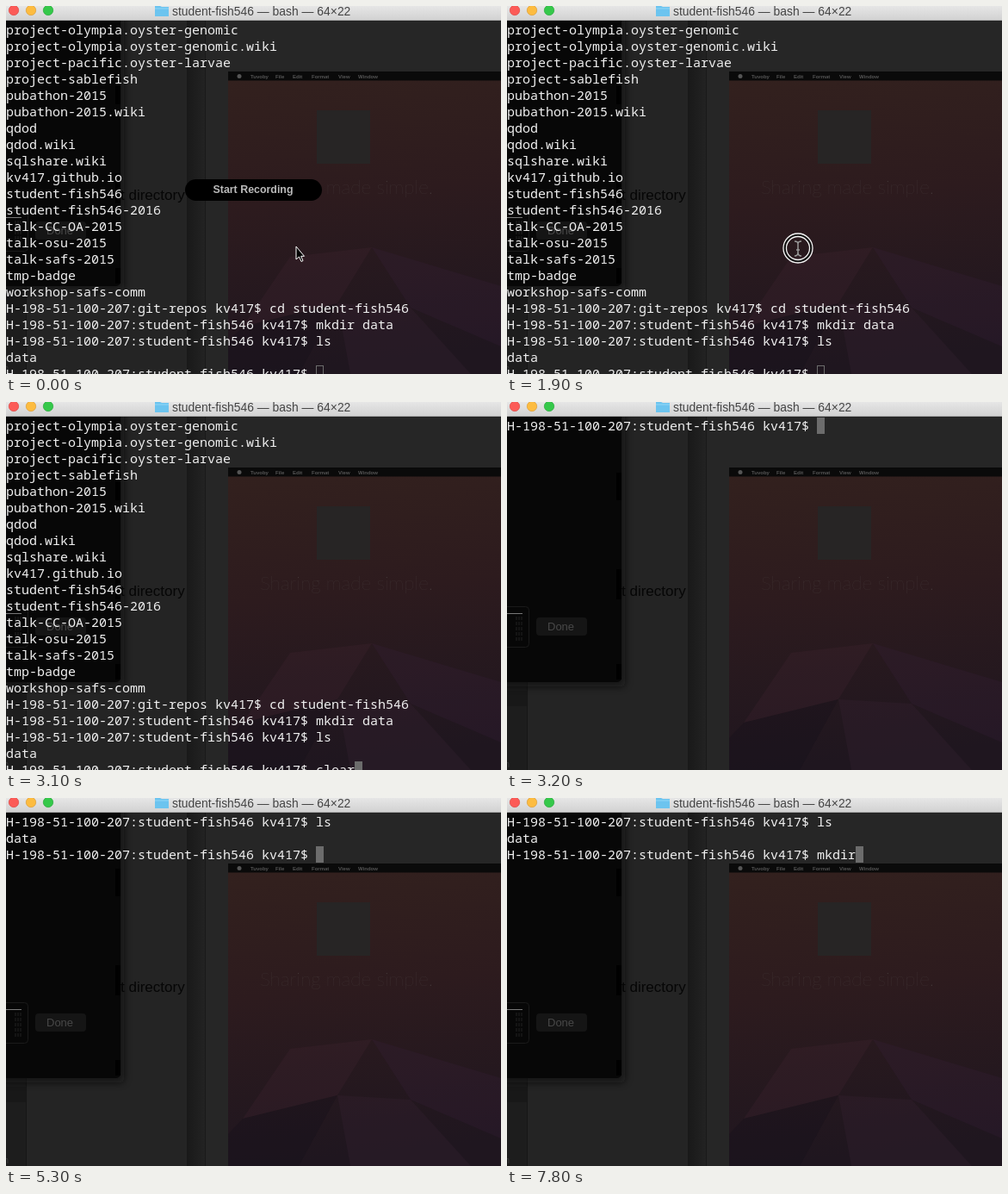
These frames come from a looping animation (575x427 px, 8000 ms). An HTML page:

```html
<!DOCTYPE html>
<html lang="en">
<head>
<meta charset="utf-8">
<title>Terminal session</title>
<style>
html, body { margin: 0; width: 100%; height: 100%; overflow: hidden; background: #242424; }
svg, pre, #caret { position: absolute; left: 0; top: 0; }
svg { width: 575px; height: 427px; font-family: "Liberation Sans", Arial, sans-serif; }
pre { margin: 0; top: 18px; color: #f0f0f0; font: 15px/19px "Noto Sans Mono", "DejaVu Sans Mono", monospace; }
#caret { box-sizing: border-box; width: 9px; height: 19px; background: #6c6c6c; }
#caret.idle { background: none; border: 1px solid #6c6c6c; }
</style>
</head>
<body>
<svg viewBox="0 0 575 427">
  <defs>
    <linearGradient id="wall" x1="0" y1="0" x2=".1" y2="1">
      <stop offset="0" stop-color="#33211e"/>
      <stop offset=".45" stop-color="#2d1b1e"/>
      <stop offset="1" stop-color="#1f161f"/>
    </linearGradient>
    <linearGradient id="edge">
      <stop offset="0" stop-color="#191919"/>
      <stop offset="1" stop-color="#232323"/>
    </linearGradient>
    <linearGradient id="bar" x1="0" y1="0" x2="0" y2="1">
      <stop offset="0" stop-color="#e6e6e6"/>
      <stop offset="1" stop-color="#d2d2d2"/>
    </linearGradient>
    <filter id="soft" x="-20%" y="-20%" width="140%" height="140%"><feGaussianBlur stdDeviation="5"/></filter>
  </defs>
  <rect width="575" height="427" fill="#242424"/>

  <!-- windows behind the terminal -->
  <rect x="210" y="17" width="22" height="410" fill="url(#edge)"/>
  <path d="M231.5 17V427" stroke="#191919"/>
  <rect x="232" y="17" width="343" height="410" fill="#262626"/>
  <rect y="325" width="23" height="102" fill="#1d1d1d"/>
  <rect y="335" width="23" height="18" fill="#181818"/>
  <path d="M23.5 325V427" stroke="#161616"/>
  <text x="-3" y="424" font-size="11" fill="#3a3a3a">n</text>
  <rect x="-10" y="10" width="147" height="320" rx="5" fill="#101010" opacity=".7" filter="url(#soft)"/>
  <rect x="-10" y="10" width="143" height="315" rx="5" fill="#070707"/>
  <path d="M130 82V114M130 194V229M130 304V322" stroke="#000" stroke-width="6"/>
  <rect x="-5" y="237.5" width="30.5" height="47" rx="4" fill="none" stroke="#1a1a1a"/>
  <path d="M0 245.5H18" stroke="#777"/>
  <path d="M11 249V278M14 249V278M17 249V278" stroke="#222" stroke-dasharray="4 2"/>
  <rect x="34" y="250" width="59" height="21" rx="4" fill="#151515"/>
  <text x="47" y="265" font-size="13" fill="#484848">Done</text>
  <text x="133" y="225" font-size="17" fill="#060606">t directory</text>

  <!-- page with wallpaper -->
  <rect x="258" y="76" width="317" height="351" fill="url(#wall)"/>
  <path d="M330 291L425 280L385 345L275 372Z" fill="#4a2a3a" opacity=".2"/>
  <path d="M425 280L575 325V395L470 350Z" fill="#3c2340" opacity=".22"/>
  <path d="M275 372L385 345L340 427H258V390Z" fill="#0c0c18" opacity=".2"/>
  <path d="M385 345L470 350L540 427H400Z" fill="#40283c" opacity=".2"/>
  <rect x="258" y="76" width="317" height="10.5" fill="#0a0a0a"/>
  <circle cx="271" cy="81.5" r="2.5" fill="#555"/>
  <g id="menu" font-size="6" fill="#555" font-weight="bold"></g>
  <rect x="361" y="121" width="62" height="62" fill="#272525"/>
  <text x="295" y="218" font-family="Lato, sans-serif" font-weight="100" font-size="22.5" fill="#463b3b">Sharing made simple.</text>

  <!-- title bar -->
  <rect width="575" height="16" fill="url(#bar)"/>
  <rect y="16" width="575" height="1" fill="#aaa"/>
  <circle cx="9" cy="5" r="5.7" fill="#fc5b57" stroke="#dd4744" stroke-width=".7"/>
  <circle cx="29" cy="5" r="5.7" fill="#fdbc40" stroke="#dd9c36" stroke-width=".7"/>
  <circle cx="49" cy="5" r="5.7" fill="#35c84a" stroke="#27a83a" stroke-width=".7"/>
  <path d="M173 0H179L181 1H189V12H173Z" fill="#6cc4ef"/>
  <path d="M173 3H189" stroke="#92d8f8"/>
  <text x="193" y="10.5" font-size="13.9" fill="#444">student-fish546 — bash — 64×22</text>
</svg>
<div id="caret"></div>
<pre id="screen"></pre>
<svg viewBox="0 0 575 427">
  <g id="pill">
    <rect x="208" y="201" width="159" height="25" rx="12.5" fill="#000"/>
    <text x="287" y="217" font-size="12.4" font-weight="bold" text-anchor="middle" fill="#bbb">Start Recording</text>
  </g>
  <path id="arrow" d="M337 279V294L340.5 291L343 296.5L345 295.5L342.7 290.3H346.5Z" fill="#000" stroke="#fff"/>
  <path id="beam" d="M334 273Q338 273 338 276V286Q338 290 334 290M342 273Q338 273 338 276V286Q338 290 342 290M336 283H340" fill="none" stroke="#999" stroke-width="1.5"/>
  <g id="ring" fill="none">
    <circle cx="338" cy="281" r="15.3" stroke="#111" stroke-width="3"/>
    <circle cx="338" cy="281" r="17" stroke="#f4f4f4" stroke-width="1.3"/>
    <circle cx="338" cy="281" r="13.5" stroke="#f4f4f4" stroke-width="1.3"/>
  </g>
</svg>
<script>
const $ = id => document.getElementById(id);
const user = "kv417", host = "H-198-51-100-207";
const prompt = dir => `${host}:${dir} ${user}$ `;
const home = prompt("student-fish546");

const history = `project-olympia.oyster-genomic
project-olympia.oyster-genomic.wiki
project-pacific.oyster-larvae
project-sablefish
pubathon-2015
pubathon-2015.wiki
qdod
qdod.wiki
sqlshare.wiki
${user}.github.io
student-fish546
student-fish546-2016
talk-CC-OA-2015
talk-osu-2015
talk-safs-2015
tmp-badge
workshop-safs-comm
${prompt("git-repos")}cd student-fish546
${home}mkdir data
${home}ls
data
${home}`;
const listed = `${home}ls\ndata\n${home}`;

// [start in ms, screen text]; the caret follows the last character
const steps = [
  [0, history],
  [2600, history + "c"], [2700, history + "cl"], [2800, history + "cle"],
  [2900, history + "clea"], [3000, history + "clear"],
  [3200, home],
  [4000, home + "o"], [4100, home + "os"], [4400, home + "o"], [4500, home],
  [4700, home + "l"], [4800, home + "ls"], [4900, home + "ls\n"],
  [5000, listed],
  [6700, listed + "m"], [6800, listed + "mk"], [7500, listed + "mkd"],
  [7600, listed + "mkdi"], [7800, listed + "mkdir"]
];

const items = { Tuvoby: 284, File: 313, Edit: 333, Format: 355, View: 386, Window: 409 };
$("menu").innerHTML = Object.entries(items)
  .map(([name, x]) => `<text x="${x}" y="83.5">${name}</text>`).join("");

const show = (id, opacity) => $(id).style.opacity = +opacity;

function draw() {
  const t = performance.now() % 8000;
  const text = steps.findLast(s => s[0] <= t)[1];
  const lines = text.split("\n");
  if ($("screen").textContent !== text) $("screen").textContent = text;
  $("caret").style.left = lines.at(-1).length * 9 + "px";
  $("caret").style.top = lines.length * 19 - 1 + "px";
  $("caret").className = t < 2000 ? "idle" : "";

  show("pill", Math.max(0, 1 - Math.floor(t / 100) / 3));
  show("arrow", t < 300);
  show("beam", t >= 300 && t < 2600);
  show("ring", t < 1900 || t >= 2100 ? 0 : t < 2000 ? 1 : .5);
  requestAnimationFrame(draw);
}
draw();
</script>
</body>
</html>
```
